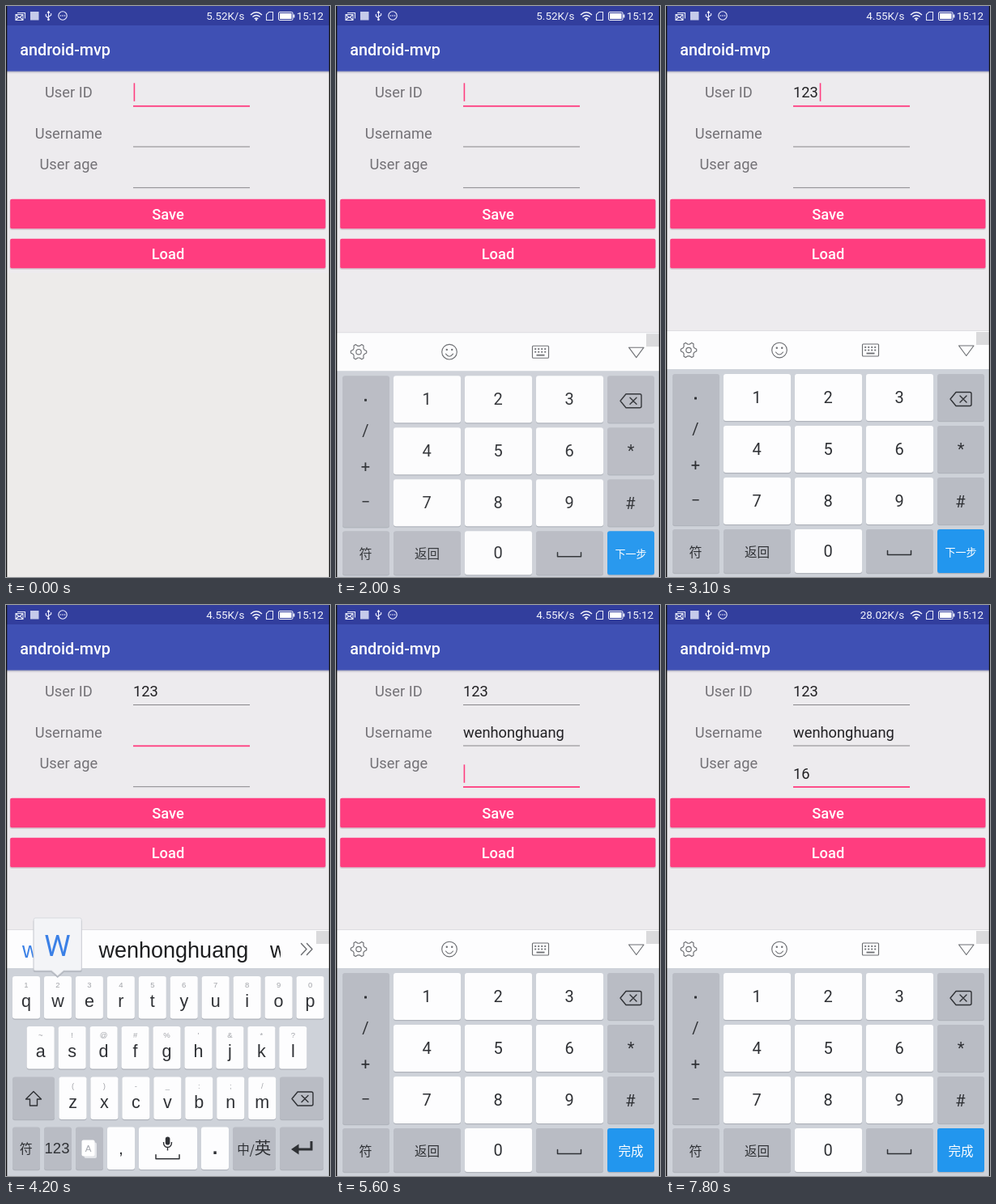
Recreate the animation shown at these times as an HTML page. Size 400x706 px, loop 8 s.

```html
<!DOCTYPE html>
<html lang="en">
<head>
<meta charset="utf-8">
<title>android-mvp form</title>
<style>
html, body { margin: 0; width: 100%; height: 100%; overflow: hidden; background: #edebee; }
svg { display: block; width: 100vw; height: 100vh; font-family: Roboto, sans-serif; }
.mid { text-anchor: middle; }
.ime { font-family: "Liberation Sans", Arial, sans-serif; }
.cjk { font-family: "Noto Sans CJK SC", "Noto Sans CJK", sans-serif; }
.line { fill: none; stroke: #6c6e72; stroke-width: 1.15; stroke-linecap: round; stroke-linejoin: round; }
</style>
</head>
<body>
<svg id="stage" viewBox="0 0 400 706"></svg>
<script>
const LOOP = 8000;
const PINK = '#ff3d7f', BLUE = '#3b80e6', DARK = '#b9bcc4', WHITE = '#fdfdfe', INK = '#2f3135';
const NAME = 'wenhonghuang';

const rect = (x, y, w, h, fill, r = 0, extra = '') =>
  `<rect x="${x}" y="${y}" width="${w}" height="${h}" rx="${r}" fill="${fill}" ${extra}/>`;
const text = (x, y, s, size, fill, cls = 'mid', extra = '') =>
  `<text x="${x}" y="${y}" font-size="${size}" fill="${fill}" class="${cls}" ${extra}>${s}</text>`;
const path = (d, extra = 'class="line"') => `<path d="${d}" ${extra}/>`;
const group = (id, body, extra = '') => `<g id="${id}" ${extra}>${body}</g>`;
const key = (x, y, w, h, fill = WHITE, extra = '') =>
  rect(x, y + 1.2, w, h, '#afb3bb', 3) + rect(x, y, w, h, fill, 3, extra);
const backspace = (x, y) =>
  path(`M${x - 13} ${y}l7-8.5h17q2 0 2 2v13q0 2-2 2h-17zM${x - 1} ${y - 4}l8 8m0-8l-8 8`,
    `class="line" style="stroke:${INK};stroke-width:1.4"`);
const bracket = (x, y) =>
  path(`M${x - 14.5} ${y - 4.5}v5h29v-5`, `class="line" style="stroke:${INK};stroke-width:1.5"`);

function statusBar() {
  return rect(0, 0, 400, 24, '#323e9d') +
    path('M14 8.5h9.5v7M12 10.5h9v7h-9zM12.5 11l4 3.5 4-3.5M12.5 17l3-3m5 3l-3-3',
      'fill="none" stroke="#e8eaf8" stroke-width="1.1"') +
    rect(30, 7, 10.5, 10.5, '#c6cbea') +
    path('M52.5 7v9.5M52.5 15l-3.2-2.5v-2.5M52.5 13.5l3.2-2.2v-2.3M51 8.6l1.5-2 1.5 2',
      'fill="none" stroke="#eef" stroke-width="1.1"') +
    '<circle cx="52.5" cy="16.8" r="1.4" fill="#eef"/>' +
    '<circle cx="70" cy="12" r="5.2" fill="none" stroke="#eef" stroke-width="1.1"/>' +
    [67.5, 70, 72.5].map(x => `<circle cx="${x}" cy="12" r=".8" fill="#eef"/>`).join('') +
    text(294.3, 17.3, '', 13.4, '#f4f5fc', '', 'id="speed" text-anchor="end"') +
    path('M302 11q7-6.5 14 0M304.4 13.6q4.6-4.2 9.2 0M306.7 16q2.3-2.1 4.6 0',
      'fill="none" stroke="#f4f5fc" stroke-width="1.4"') +
    '<circle cx="309" cy="17.2" r="1.1" fill="#f4f5fc"/>' +
    path('M324.5 7.5h5v10h-8v-7z', 'fill="none" stroke="#e3e6f6" stroke-width="1.1"') +
    rect(336.5, 7.5, 17.5, 10, 'none', 1.5, 'stroke="#f4f5fc"') +
    rect(338, 9, 14.5, 7, '#fff') + rect(354.5, 10.5, 1.8, 4, '#f4f5fc') +
    text(392, 17.3, '15:12', 13.4, '#f4f5fc', '', 'text-anchor="end"');
}

function button(y, label) {
  return rect(4.6, y, 390.4, 37.8, '#d3c6cf', 2.4) + rect(5.2, y - 0.3, 389.2, 36.6, PINK, 2) +
    text(200, y + 25, label, 18.3, '#fff', 'mid', 'font-weight="500"');
}

const ROWS = [
  { label: 'User ID', ly: 113, ty: 113, line: 123 },
  { label: 'Username', ly: 164, ty: 164, line: 173.5 },
  { label: 'User age', ly: 202, ty: 215, line: 224.2 }
];

function form() {
  return rect(0, 0, 400, 706, '#edebee') +
    group('idle', rect(0, 330, 400, 376, '#edebea')) +
    rect(0, 80, 400, 2, '#b9b9c8') + rect(0, 82, 400, 1.4, '#dcdae1') +
    rect(0, 24, 400, 56.6, '#3f50b4') + statusBar() +
    text(17.3, 61, 'android-mvp', 19.8, '#fff', '', 'font-weight="500"') +
    ROWS.map((r, i) =>
      text(77.3, r.ly, r.label, 18.3, '#747277') +
      text(157, r.ty, '', 18.3, '#222124', '', `id="value${i}"`) +
      rect(157, r.line, 144, 1, '#88868a', 0, `id="rule${i}"`)).join('') +
    rect(0, 0, 1.6, 22.5, PINK, 0, 'id="cursor"') +
    button(239, 'Save') + button(288, 'Load');
}

function toolbar() {
  let gear = '';
  for (let i = 0; i < 24; i++) {
    const a = (i - 0.5) * Math.PI / 12, r = i % 4 < 2 ? 9.8 : 7.4;
    gear += `${i ? 'L' : 'M'}${(28 + r * Math.cos(a)).toFixed(1)} ${(425.5 + r * Math.sin(a)).toFixed(1)}`;
  }
  let dots = '';
  for (let i = 0; i < 8; i++) dots += rect(245.2 + i % 4 * 4, 421 + (i >> 2) * 3.6, 2, 1.8, '#6c6e72');
  return path(gear + 'z') + '<circle class="line" cx="28" cy="425.5" r="3.2"/>' +
    '<circle class="line" cx="140" cy="425.5" r="9.3"/>' +
    path('M135.5 428q4.5 6 9 0') +
    '<circle cx="136.8" cy="422.7" r="1.2" fill="#6c6e72"/><circle cx="143.2" cy="422.7" r="1.2" fill="#6c6e72"/>' +
    rect(242.5, 418, 20, 15, 'none', 1, 'class="line"') + dots + rect(247.5, 428.6, 10, 1.8, '#6c6e72') +
    path('M361.5 420h18.5l-9.25 12.5z');
}

function candidates() {
  return '<clipPath id="clip"><rect x="0" y="402" width="339" height="47"/></clipPath>' +
    '<g clip-path="url(#clip)">' +
    text(20, 436, 'when', 27, BLUE, 'ime') +
    text(114.5, 436, NAME, 27, '#1d1e20', 'ime') +
    text(326, 436, 'with', 27, '#1d1e20', 'ime') + '</g>' +
    path('M364.5 418.5l6.5 7-6.5 7m7-14l6.5 7-6.5 7', 'class="line" style="stroke-width:1.4"');
}

function numberPad() {
  let s = key(8, 455, 58, 187, DARK);
  s += rect(35, 483.5, 3, 3, INK, 0.6);
  [['/', 529.5], ['+', 574], ['−', 618]].forEach(([c, y]) => s += text(36.5, y, c, 20, INK));
  for (let i = 0; i < 9; i++) {
    const x = 71 + i % 3 * 88, y = 455 + Math.floor(i / 3) * 64;
    s += key(x, y, 83, 58, WHITE, i ? '' : 'id="one"') + text(x + 41.2, y + 36, i + 1, 20, INK);
  }
  for (let i = 0; i < 3; i++) s += key(335, 455 + i * 64, 58, 58, DARK);
  s += backspace(364, 486) + text(364, 555, '*', 20, INK) + text(363.5, 620, '#', 20, INK);
  s += key(8, 647, 58, 54, DARK) + text(36.5, 680.5, '符', 16, INK, 'mid cjk');
  s += key(71, 647, 83, 54, DARK) + text(112.5, 680.5, '返回', 15.5, INK, 'mid cjk');
  s += key(159, 647, 83, 54) + text(200.2, 681, '0', 20, INK);
  s += key(247, 647, 83, 54, DARK) + bracket(288, 678);
  s += key(335, 647, 58, 54, '#2296ee') + text(364, 680, '', 13, '#fff', 'mid cjk', 'id="action"');
  return s;
}

function letterRow(letters, hints, cx, y) {
  return [...letters].map((c, i) => {
    const x = cx + i * 38.95;
    return key(x - 17, y, 34, 52.5) +
      text(x, y + 14.2, hints[i], 9.5, '#a2a4a9', 'mid ime') +
      text(x, y + 38.4, c, 21.5, INK, 'mid ime');
  }).join('');
}

function letterPad() {
  const bottom = [[8, 34, DARK], [47, 34, DARK], [86, 34, DARK], [125, 34, WHITE], [164, 72, WHITE],
    [241, 34, WHITE], [280, 53, DARK], [338, 54, DARK]];
  return letterRow('qwertyuiop', '1234567890', 25, 459) +
    letterRow('asdfghjkl', ['~', '!', '@', '#', '%', "'", '&amp;', '*', '?'], 42.7, 521) +
    letterRow('zxcvbnm', '()-_:;/', 82.5, 583.5) +
    key(8, 583.5, 52, 52.5, DARK) + key(338, 583.5, 54, 52.5, DARK) +
    path('M34 601.5l-9.5 9.5h5v8h9v-8h5z', `class="line" style="stroke:${INK};stroke-width:1.4"`) +
    backspace(366, 610.5) +
    bottom.map(([x, w, fill]) => key(x, 645.5, w, 52.5, fill)).join('') +
    text(24.7, 677.5, '符', 16, INK, 'mid cjk') + text(63, 678, '123', 18.5, INK, 'mid ime') +
    rect(96.5, 664.5, 15.5, 19.5, '#e3e5e9', 2) + rect(93.5, 661.5, 16, 20, '#fff', 2) +
    text(101.5, 676, 'A', 11.5, '#a3a6ad', 'mid ime') +
    text(142, 679, ',', 21, INK, 'mid ime') +
    rect(196.8, 657.5, 5.6, 10, INK, 2.8) +
    path('M194.5 664q0 6.5 5 6.500t5-6.5M199.5 670.5v4', `fill="none" stroke="${INK}" stroke-width="1.4"`) +
    bracket(199.5, 684.3) +
    text(258, 679, '.', 24, INK, 'mid ime', 'font-weight="700"') +
    text(306.3, 679, '中/<tspan font-size="20.5">英</tspan>', 15.5, INK, 'mid cjk') +
    path('M377 663v10h-20', `fill="none" stroke="${INK}" stroke-width="3"`) +
    path('M352 673l9.5-6.5v13z', `fill="${INK}"`);
}

function keyboard() {
  return rect(0, 402, 400, 306, '#ced2d9') + rect(0, 401, 400, 1, '#dedde1') + rect(0, 402, 400, 47, WHITE) +
    group('tools', toolbar()) + group('words', candidates()) +
    rect(383, 403, 16, 16, '#dadadc') +
    group('numbers', numberPad()) + group('letters', letterPad()) +
    group('preview', rect(1, 368, 65, 34, '#949297', 0, 'id="previewBox"') +
      text(9, 396, '', 27, '#fff', 'ime', 'id="typed"')) +
    group('popup',
      path('M-28 2h56q2 0 2 2v61q0 2-2 2h-20l-8 7-8-7h-20q-2 0-2-2v-61q0-2 2-2z', 'fill="#b4b8c0"') +
      path('M-27.5 0h55q2 0 2 2v61q0 2-2 2h-20l-7.5 6.5-7.5-6.5h-20q-2 0-2-2v-61q0-2 2-2z',
        'fill="#f3f4f7" stroke="#d2d5da" stroke-width=".8"') +
      text(-0.3, 46.5, '', 36.5, BLUE, 'mid', 'id="big"'));
}

const svg = document.getElementById('stage');
svg.innerHTML = form() + group('keyboard', keyboard()) +
  rect(0, 0, 1.3, 706, '#111') + rect(398.8, 0, 1.2, 706, '#111');

const el = {};
svg.querySelectorAll('[id]').forEach(n => el[n.id] = n);
const show = (id, on) => el[id].setAttribute('visibility', on ? 'inherit' : 'hidden');
const set = (id, attrs) => { for (const k in attrs) el[id].setAttribute(k, attrs[k]); };
const within = (t, a, b) => t >= a && t < b;
const typedAt = (t, s, times) => s.slice(0, times.filter(x => t >= x).length);

// start, end, key centre, key top, character
const POPUPS = [
  [2500, 2700, 112, 455, '1'], [2700, 2900, 200, 455, '2'], [2900, 3100, 288, 455, '3'],
  [4000, 4300, 63.7, 459, 'W'], [4400, 4600, 102.5, 459, 'E'], [4700, 4900, 277, 583.5, 'N'],
  [6900, 7200, 112, 455, '1'], [7300, 7500, 288, 519, '6']
];
// moments when the caret blink restarts
const RESETS = [-200, 2500, 2700, 2900, 3400, 5100, 5600, 6900, 7300];

function render(time) {
  const t = Math.floor(time / 100) * 100;
  const focus = t < 3400 ? 0 : t < 5600 ? 1 : 2;
  const values = [
    typedAt(t, '123', [2500, 2700, 2900]),
    t >= 5100 ? NAME : '',
    typedAt(t, '16', [6900, 7300])
  ];

  el.speed.textContent = t < 2500 ? '5.52K/s' : t < 5900 ? '4.55K/s' : '28.02K/s';
  ROWS.forEach((r, i) => {
    const active = i === focus;
    el['value' + i].textContent = values[i];
    set('rule' + i, { fill: active ? PINK : '#88868a', height: active ? 1.8 : 1, y: r.line - (active ? 0.1 : 0) });
  });

  const last = RESETS.filter(x => x <= t).pop();
  const width = values[focus] ? el['value' + focus].getComputedTextLength() + 1.3 : 0;
  set('cursor', { x: 157.6 + width, y: ROWS[focus].ty - 17.7 });
  show('cursor', Math.floor((t - last) / 500) % 2 === 0);

  const left = 1 - Math.min(1, Math.max(0, (t - 1750) / 310));
  set('keyboard', { transform: `translate(0 ${304 * left ** 3})`, opacity: 1 - left ** 2 });
  show('keyboard', t >= 1800);
  show('idle', t < 1800);

  const composing = within(t, 4100, 5100);
  show('letters', focus === 1);
  show('numbers', focus !== 1);
  show('words', composing);
  show('tools', !composing);
  el.action.textContent = focus === 0 ? '下一步' : '完成';
  set('action', { 'font-size': focus === 0 ? 13 : 15.5, y: focus === 0 ? 680 : 680.5 });
  set('one', { fill: t === 2500 || t === 6900 ? '#e2e4e8' : WHITE });

  el.typed.textContent = typedAt(t, 'wen', [4100, 4500, 4800]);
  set('previewBox', { width: el.typed.getComputedTextLength() + 15.5 });
  show('preview', within(t, 4300, 5100));

  const pop = POPUPS.find(([a, b]) => within(t, a, b));
  show('popup', !!pop);
  if (pop) {
    set('popup', { transform: `translate(${pop[2]} ${pop[3] - 72})` });
    el.big.textContent = pop[4];
  }
}

function tick() {
  render(performance.now() % LOOP);
  requestAnimationFrame(tick);
}
tick();
</script>
</body>
</html>
```
